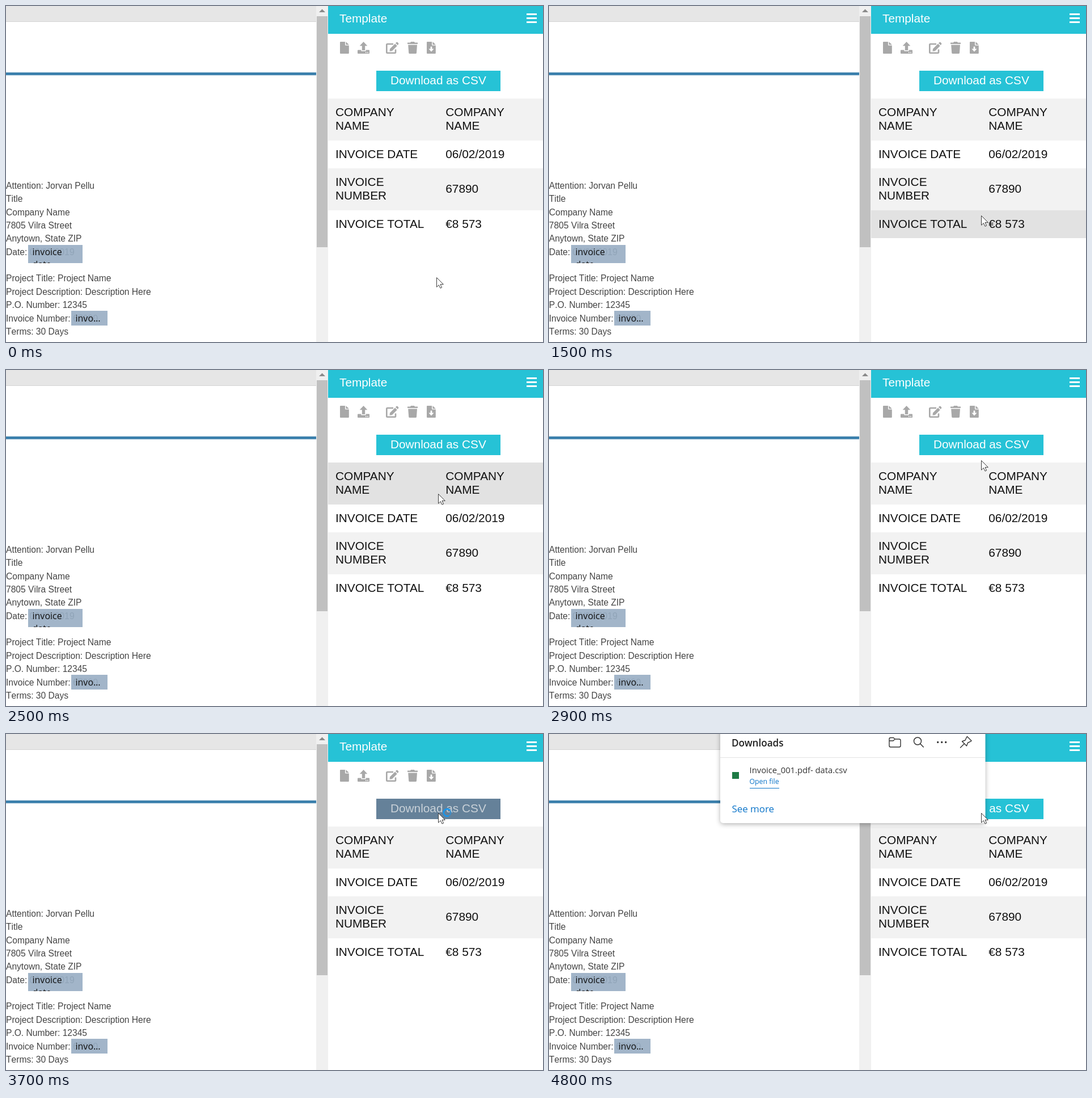
Write an HTML page with a canvas that moves like this. It is 947x592 px and loops after 7700 ms.

```html
<!DOCTYPE html>
<html lang="en">
<head>
<meta charset="utf-8">
<title>Invoice template</title>
<style>
html, body { margin: 0; width: 100%; height: 100%; overflow: hidden; background: #fff; }
canvas { display: block; }
</style>
</head>
<body>
<canvas id="stage" width="947" height="592"></canvas>
<script>
const ctx = document.getElementById('stage').getContext('2d');
const LOOP = 7700, STEP = 100;
const ARIAL = '"Liberation Sans", Arial, sans-serif';
const OPEN = '"Open Sans", "Noto Sans", sans-serif';
const TEAL = '#26c2d6', ICON = '#a8a8a8', INK = '#333', LINK = '#0b74c9';

// Pointer tip: time, x, y
const PATH = [
  [600, 759, 478], [800, 761, 452], [1500, 762, 369], [2100, 762, 281],
  [2500, 762, 218], [3000, 762, 144], [3200, 762, 139]
];

const ROWS = [
  { top: 163, end: 237, label: ['COMPANY', 'NAME'], value: ['COMPANY', 'NAME'] },
  { top: 237, end: 286, label: ['INVOICE DATE'], value: ['06/02/2019'] },
  { top: 286, end: 360, label: ['INVOICE', 'NUMBER'], value: ['67890'] },
  { top: 360, end: 409, label: ['INVOICE TOTAL'], value: ['€8 573'] }
];

const DOC = [
  'Attention: Jorvan Pellu', 'Title', 'Company Name', '7805 Vilra Street', 'Anytown, State ZIP',
  'Date:', '', 'Project Title: Project Name', 'Project Description: Description Here',
  'P.O. Number: 12345', 'Invoice Number:', 'Terms: 30 Days'
];

const ARROW = new Path2D('M.5 .5V17.2L4.3 13.5L7 19.2L9.6 18L7 12.4H12.3Z');
const HAND = new Path2D('M-1.6 13.6V2C-1.6-.3 1.7-.3 1.7 2V8C2.2 6.5 4.6 6.8 4.7 8.6C5.3 7.4 7.5 7.8 7.6 9.4' +
  'C8.6 8.6 10.5 9.4 10.5 11.2V15.2C10.5 18 8.8 18.8 8.7 22H-.4C-.6 19.4-2 18.2-3.2 16.8L-6.7 12.7C-7.8 11-5.6 9.6-4.3 11Z');

function rect(x, y, w, h, color) {
  ctx.fillStyle = color;
  ctx.fillRect(x, y, w, h);
}

function text(str, x, y, size, color, family = ARIAL, weight = 400) {
  ctx.font = `${weight} ${size}px ${family}`;
  ctx.fillStyle = color;
  ctx.fillText(str, x, y);
}

function fillPath(d, color) {
  ctx.fillStyle = color;
  ctx.fill(new Path2D(d));
}

function strokePath(d, color, width) {
  ctx.strokeStyle = color;
  ctx.lineWidth = width;
  ctx.stroke(new Path2D(d));
}

function arc(x, y, r, from, to, color, width) {
  ctx.strokeStyle = color;
  ctx.lineWidth = width;
  ctx.beginPath();
  ctx.arc(x, y, r, from, to);
  ctx.stroke();
}

function tag(x, y, w, h, ghost, ghostX, base, lines) {
  ctx.save();
  rect(x, y, w, h, '#a2b5c9');
  ctx.beginPath();
  ctx.rect(x, y, w, h);
  ctx.clip();
  text(ghost, ghostX, base, 15.8, '#90a4b8');
  lines.forEach((s, i) => text(s, x + 7.5, base + .4 + i * 21.8, 16, '#111', OPEN));
  ctx.restore();
}

function drawDocument() {
  rect(0, 0, 547, 27, '#e6e6e6');
  rect(0, 27, 547, 1, '#d3d3d3');
  rect(0, 116.6, 547, 5.8, 'rgba(53,124,170,.4)');
  rect(0, 117.4, 547, 4.2, '#357caa');
  ctx.fontKerning = 'none';
  DOC.forEach((s, i) => text(s, 0, 322 + i * 23.35, 15.6, '#444'));
  tag(39, 421, 96, 32, '06/02/2019', 41.6, 438.8, ['invoice', 'date']);
  tag(115, 537, 64, 26, '67890', 118, 555.5, ['invo…']);
  ctx.fontKerning = 'auto';

  rect(547, 0, 21, 592, '#f0f0f0');
  rect(548, 18, 19, 407, '#c0c0c0');
  fillPath('M552 11L557.5 5.5L563 11Z', '#8a8a8a');
}

function drawFile(x) {
  fillPath(`M${x} 64Q${x} 63 ${x + 1} 63H${x + 9}V68.6Q${x + 9} 69.6 ${x + 10} 69.6H${x + 15.8}V83` +
    `Q${x + 15.8} 84 ${x + 14.8} 84H${x + 1}Q${x} 84 ${x} 83Z` +
    `M${x + 10.4} 63L${x + 15.8} 68.3H${x + 10.4}Z`, ICON);
}

function drawToolbar() {
  drawFile(589);
  fillPath('M630.5 63L637.3 70.3H633.2V78H627.8V70.3H623.7Z', ICON);
  fillPath('M621 77.5H626.4V79.4H634.6V77.5H640Q641 77.5 641 78.5V83Q641 84 640 84H621Q620 84 620 83V78.5Q620 77.5 621 77.5Z', ICON);
  rect(634, 81, 1.6, 1.6, '#fff');
  rect(637.2, 81, 1.6, 1.6, '#fff');
  strokePath('M683 67H672.5Q671.3 67 671.3 68.2V81.5Q671.3 82.7 672.5 82.7H685.8Q687 82.7 687 81.5V76.5', ICON, 2.6);
  fillPath('M686 66.4L689.8 70.2L680.8 79.2L676.5 79.7L677 75.4ZM687 65.4L688.6 63.8Q689.6 63 690.6 63.9L692 65.4Q692.8 66.4 692 67.4L690.7 69.1Z', ICON);
  fillPath('M708 64.5H713L714 63H720L721 64.5H726V67H708Z', ICON);
  fillPath('M709.2 68.4H725L724 82.4Q723.9 84 722.3 84H712Q710.3 84 710.2 82.4Z', ICON);
  drawFile(742);
  fillPath('M748.6 71.5H751.4V75.5H754.6L750 80.5L745.4 75.5H748.6Z', '#fff');
}

function drawPanel(tip, overButton) {
  rect(568, 0, 379, 49, TEAL);
  text('Template', 588, 29, 20.8, '#fff');
  for (let i = 0; i < 3; i++) rect(918, 13 + i * 7, 18, 3, '#fff');
  drawToolbar();

  rect(653, 114, 219, 36, overButton ? '#658199' : TEAL);
  text('Download as CSV', 678, 138, 20.8, overButton ? '#c9d1d8' : '#fff');

  ROWS.forEach((row, i) => {
    const hover = tip.y >= row.top && tip.y < row.end;
    const mid = (row.top + row.end) / 2;
    rect(568, row.top, 379, row.end - row.top, hover ? '#e2e2e2' : i % 2 ? '#fff' : '#f2f2f2');
    [[row.label, 581], [row.value, 775.3]].forEach(([lines, x]) => {
      const first = mid + 6.3 - (lines.length - 1) * 11.9;
      lines.forEach((s, k) => text(s, x, first + k * 23.8, 20.8, '#111'));
    });
  });
}

function drawPopup(shown) {
  ctx.save();
  ctx.globalAlpha = shown;
  ctx.translate(0, -14 * (1 - shown));
  ctx.save();
  ctx.shadowColor = 'rgba(0,0,0,.3)';
  ctx.shadowBlur = 9;
  ctx.shadowOffsetY = 2;
  ctx.fillStyle = '#fff';
  ctx.beginPath();
  ctx.roundRect(302, -20, 467.5, 177, 5);
  ctx.fill();
  ctx.restore();
  rect(302, 41, 467, 1, '#e3e3e3');

  text('Downloads', 322, 22, 17.1, '#222', OPEN, 600);
  text('Invoice_001.pdf- data.csv', 353.6, 69.4, 14.75, INK, OPEN);
  text('Open file', 353.5, 88.4, 12.3, LINK, OPEN);
  rect(354, 95, 52, 1, LINK);
  text('See more', 322.5, 138, 16.9, LINK, OPEN);
  rect(323, 67, 12, 12, '#1e7b45');

  ctx.lineJoin = ctx.lineCap = 'round';
  strokePath('M602.5 6.5H607.5L610 9H617.5Q620 9 620 11.5V20.5Q620 23 617.5 23H602.5Q600 23 600 20.5V9Q600 6.5 602.5 6.5ZM600 12H607L610 9', INK, 1.4);
  arc(650, 12.5, 6.5, 0, 7, INK, 1.5);
  strokePath('M655 17.5L660.3 23', INK, 1.5);
  [685.7, 692.7, 699.7].forEach(x => arc(x, 14.5, .8, 0, 7, INK, 1.7));
  strokePath('M737.5 4.5L745 12L743.5 13.2L738.5 15.5L736.5 21L728.5 13L734 11L736.3 6ZM732 17.5L725.5 24', INK, 1.4);
  ctx.restore();
}

function drawPointer(shape, tip) {
  ctx.save();
  ctx.translate(tip.x, tip.y);
  ctx.lineJoin = 'round';
  ctx.fillStyle = '#fff';
  ctx.fill(shape);
  ctx.strokeStyle = '#3c3c3c';
  ctx.lineWidth = 1;
  ctx.stroke(shape);
  if (shape === HAND) strokePath('M1.7 8V12M4.7 8.6V12M7.6 9.4V12.4', '#3c3c3c', 1);
  ctx.restore();
}

function drawSpinner(t) {
  const turn = (Math.min(t, 3700) - 3500) / STEP * .9 - .6;
  arc(778, 138.5, 6.3, 0, 7, '#3a8dcb', 2.2);
  arc(778, 138.5, 6.3, turn, turn + 4.4, '#1597f0', 2.4);
}

function tipAt(t) {
  const last = PATH[PATH.length - 1];
  if (t <= PATH[0][0]) return { x: PATH[0][1], y: PATH[0][2] };
  if (t >= last[0]) return { x: last[1], y: last[2] };
  const i = PATH.findIndex(p => p[0] > t);
  const [t0, x0, y0] = PATH[i - 1], [t1, x1, y1] = PATH[i];
  const k = (t - t0) / (t1 - t0);
  return { x: Math.round(x0 + (x1 - x0) * k), y: Math.round(y0 + (y1 - y0) * k) };
}

function draw(time) {
  const t = Math.floor(time % LOOP / STEP) * STEP;
  const tip = tipAt(t);
  const popup = t >= 4800 ? 1 : t >= 4700 ? .85 : t >= 4600 ? .5 : 0;
  const overButton = tip.y < 150 && !popup;
  rect(0, 0, 947, 592, '#fff');
  drawDocument();
  drawPanel(tip, overButton);
  if (popup) drawPopup(popup);
  drawPointer(overButton && t < 3500 ? HAND : ARROW, tip);
  if (overButton && t >= 3500) drawSpinner(t);
}

const start = performance.now();
function tick() {
  draw(performance.now() - start);
  requestAnimationFrame(tick);
}
tick();
</script>
</body>
</html>
```
